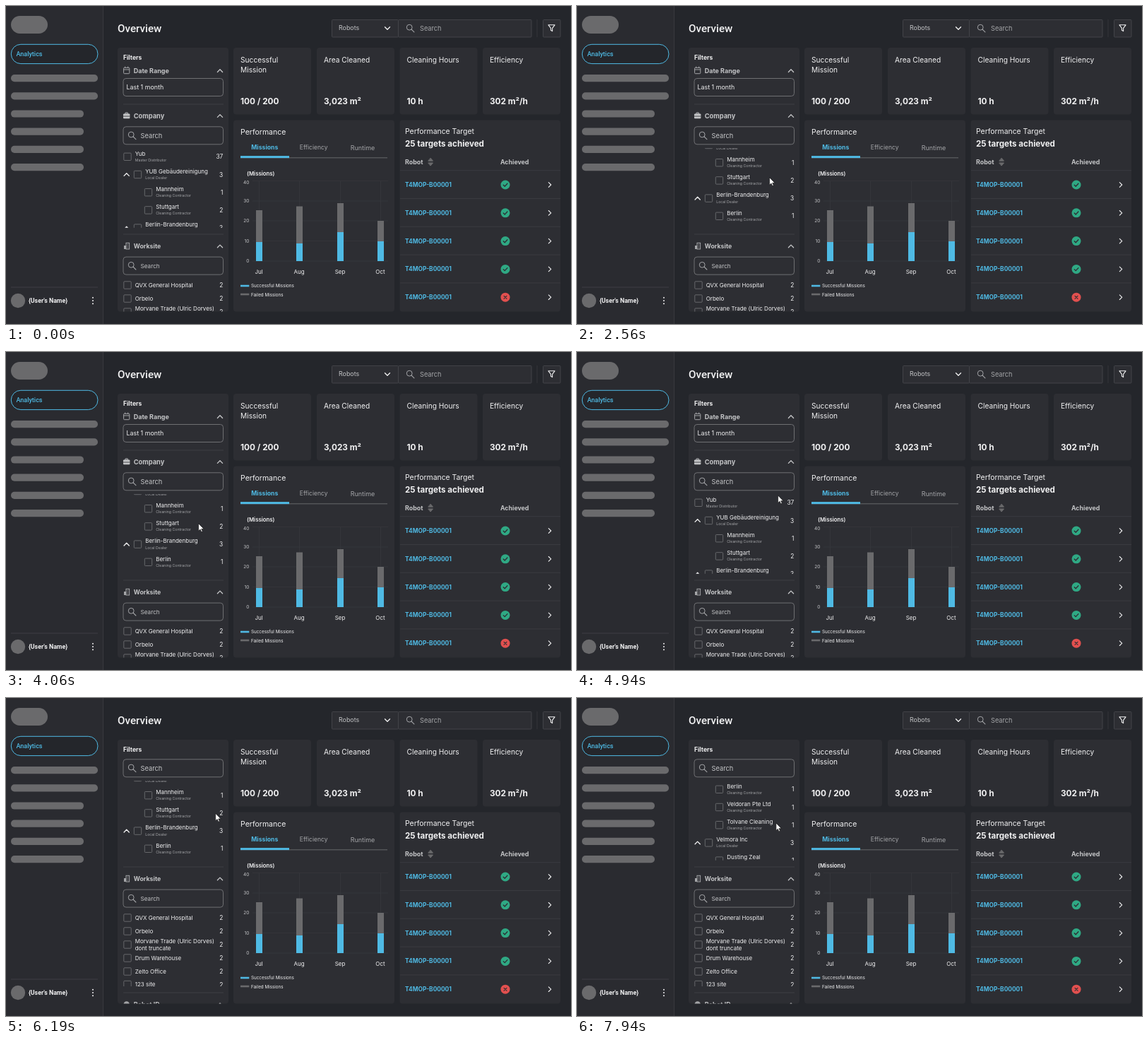
An HTML page for the animation above (8 s loop, 800x450 px).

```html
<!DOCTYPE html>
<html lang="en">
<head>
<meta charset="utf-8">
<title>Overview</title>
<style>
  html, body { margin: 0; width: 100%; height: 100%; overflow: hidden; background: #24262b; }
  svg { display: block; width: 800px; height: 450px; }
  text { font-family: Inter, "Open Sans", sans-serif; white-space: pre; }
  .rb { font-family: Roboto, Arial, sans-serif; }
</style>
</head>
<body>
<svg id="stage" viewBox="0 0 800 450" xmlns="http://www.w3.org/2000/svg"></svg>
<script>
const WHITE = '#f1f1f2', SOFT = '#c3c4c6', DIM = '#a4a5a8', GREY = '#6a6a6c';
const BLUE = '#4fbae4', CARD = '#2d2e33', EDGE = '#424348', LINE = '#3e3f44', RIM = '#6e6f72';

// ---- drawing helpers: each returns SVG markup ----
const rect = (x, y, w, h, fill, r = 0, stroke = 'none', sw = 1) =>
  `<rect x="${x}" y="${y}" width="${w}" height="${h}" rx="${r}" fill="${fill}" stroke="${stroke}" stroke-width="${sw}"/>`;
const path = (d, stroke, sw = 1, fill = 'none') =>
  `<path d="${d}" fill="${fill}" stroke="${stroke}" stroke-width="${sw}" stroke-linecap="round" stroke-linejoin="round"/>`;
const dot = (x, y, r, fill, stroke = 'none') =>
  `<circle cx="${x}" cy="${y}" r="${r}" fill="${fill}" stroke="${stroke}"/>`;
const hline = (x1, x2, y, c = LINE, w = 1) => rect(x1, y - w / 2, x2 - x1, w, c);
// y is the middle of the capitals
const text = (x, y, s, size, fill = WHITE, weight = 400, anchor = 'start', cls = '') =>
  `<text x="${x}" y="${(y + size * 0.36).toFixed(2)}" font-size="${size}" font-weight="${weight}" fill="${fill}" text-anchor="${anchor}" class="${cls}">${s}</text>`;
const clip = (id, x, y, w, h) => `<clipPath id="${id}">${rect(x, y, w, h, '#000')}</clipPath>`;

const up = (x, y, c = SOFT) => path(`M${x - 3.6} ${y + 1.9}l3.6 -3.7 3.6 3.7`, c, 1.3);
const down = (x, y) => path(`M${x - 3.5} ${y - 1.8}l3.5 3.6 3.5 -3.6`, WHITE, 1.3);
const next = (x, y) => path(`M${x - 1.7} ${y - 3.3}l3.4 3.3 -3.4 3.3`, WHITE, 1.1);
const lens = (x, y) => dot(x - 1.3, y - 1.3, 3.9, 'none', DIM) + path(`M${x + 1.6} ${y + 1.6}l3.8 3.8`, DIM, 1.1);
const box = (x, y) => rect(x - 5.2, y - 5.2, 10.4, 10.4, 'none', 1, RIM, 0.9);
const field = y => rect(166, y - 12.5, 141.5, 25, 'none', 4, RIM);

// ---- sidebar ----
function sidebar() {
  const bars = [123, 123, 103, 103, 103, 103];
  return rect(0, 0, 137, 450, '#2a2b30') + rect(137, 0, 1, 450, '#393a3f') +
    rect(7, 14, 52, 25, GREY, 12.5) +
    rect(7.3, 54.3, 122.7, 27.3, '#24262b', 13.6, BLUE) +
    text(14.5, 68.2, 'Analytics', 9, BLUE, 500, 'start', 'rb') +
    bars.map((w, i) => rect(7, 97 + i * 25.2, w, 10.2, GREY, 5)).join('') +
    hline(7, 130, 398) + dot(17, 417, 10.2, GREY) +
    text(32, 417.3, "{User's Name}", 8.8, WHITE, 700, 'start', 'rb') +
    [412.8, 417, 421.2].map(y => dot(123, y, 1, WHITE)).join('');
}

// ---- top bar ----
function topBar() {
  return text(158, 31.5, 'Overview', 15.2, WHITE, 500, 'start', 'rb') +
    rect(461.5, 19.5, 94, 24.5, CARD, 1, EDGE) + text(471, 31.2, 'Robots', 8.9, SOFT) + down(540, 31.5) +
    rect(555.5, 19.5, 188.5, 24.5, CARD, 1, EDGE) + lens(572.5, 31.5) + text(586, 31.5, 'Search', 9.2, DIM) +
    rect(751.5, 19, 1, 25, '#34353a') +
    rect(760.5, 19.5, 24.5, 24.5, CARD, 1, EDGE) +
    path('M768 26.8h9l-3.4 4.6v4.2l-2.2 -1.3v-2.9z', WHITE, 1.1);
}

// ---- summary cards ----
function cards() {
  const data = [
    [322, ['Successful', 'Mission'], '100 / 200'], [440, ['Area Cleaned'], '3,023 m²'],
    [557.5, ['Cleaning Hours'], '10 h'], [675, ['Efficiency'], '302 m²/h']
  ];
  return data.map(([x, title, value]) => rect(x, 59, 110, 94.5, CARD, 4) +
    title.map((s, i) => text(x + 10, 76.3 + i * 14, s, 10.2, WHITE)).join('') +
    text(x + 10, 134.5, value, 11.8, WHITE, 700)).join('');
}

// ---- chart ----
function chart() {
  const bars = [['Jul', 354, 289, 334], ['Aug', 411, 283.5, 336], ['Sep', 469, 279, 320], ['Oct', 526, 304, 333]];
  const ticks = [[40, 250, 247.5], [30, 276, 276], [20, 304, 304], [10, 332.5, 332.5], [0, 361, 361]];
  return rect(322, 161.5, 228, 271, CARD, 4) + text(332, 178.3, 'Performance', 10.5) +
    hline(332, 540, 214.8, '#66676a') + hline(332, 401, 213.6, BLUE, 3) +
    text(366.3, 200.3, 'Missions', 8.7, BLUE, 700, 'middle') +
    text(435.7, 200.3, 'Efficiency', 8.6, DIM, 400, 'middle') +
    text(505, 200.3, 'Runtime', 9, DIM, 400, 'middle') +
    text(341, 236.8, '(Missions)', 7.8, WHITE, 600) +
    ticks.map(([n, y, g]) => text(344.3, y, n, 6.5, SOFT, 400, 'end') + hline(349, 541, g, '#36373c', 0.8)).join('') +
    bars.map(([m, x, top, mid]) => rect(x + 4, 247.5, 0.8, 113.5, '#36373c') +
      rect(x, top, 9, mid - top, GREY) + rect(x, mid, 9, 361 - mid, BLUE) +
      text(x + 4, 376.3, m, 8, WHITE, 400, 'middle')).join('') +
    hline(332, 344.3, 396, BLUE, 2.6) + text(347, 396.2, 'Successful Missions', 6.3) +
    hline(332, 344.3, 408, GREY, 2.6) + text(347, 408.4, 'Failed Missions', 6.3);
}

// ---- targets table ----
function targets() {
  const row = i => {
    const y = 253 + i * 39.8, ok = i < 4;
    const mark = ok ? path(`M704.2 ${y + 0.2}l2 2 3.7 -4`, CARD, 1.3)
                    : path(`M705.1 ${y - 1.9}l3.8 3.8m0 -3.8l-3.8 3.8`, CARD, 1.2);
    return hline(558, 785, y - 20.3, '#3a3b40') +
      text(565, y, 'T4MOP-B00001', 8.4, BLUE, 700) +
      dot(707, y, 6.5, ok ? '#2fa984' : '#e2504f') + mark + next(770, y);
  };
  return rect(557.5, 161.5, 227.5, 271, CARD, 4) +
    text(565, 177.3, 'Performance Target', 10.4) +
    text(565, 195.2, '25 targets achieved', 11.6, WHITE, 700) +
    text(565, 220.5, 'Robot', 8.9, SOFT, 700) + text(700, 220.5, 'Achieved', 8.8, SOFT, 700) +
    path('M601.3 215.4l3.2 3.8h-6.4z', GREY, 1, GREY) + path('M601.3 225.8l3.2 -3.8h-6.4z', GREY, 1, GREY) +
    [0, 1, 2, 3, 4].map(row).join('');
}

// ---- filter panel ----
// name, level, count
const companies = [
  ['Yub', 0, 37], ['YUB Gebäudereinigung', 1, 3], ['Mannheim', 2, 1], ['Stuttgart', 2, 2],
  ['Berlin-Brandenburg', 1, 3], ['Berlin', 2, 1], ['Veldoran Pte Ltd', 2, 1], ['Tolvane Cleaning', 2, 1],
  ['Velmora Inc', 1, 3], ['Dusting Zeal', 2, 1], ['Dusting Zeal 2', 2, 1],
  ['Quorbeckham Supplies', 1, 3], ['Plumo Clean', 2, 1], ['Plumo Floors', 2, 1], ['Plumo Glass', 2, 1]
];
const roles = ['Master Distributor', 'Local Dealer', 'Cleaning Contractor'];
const sites = [
  [395, 'QVX General Hospital'], [414, 'Orbelo'], [433, 'Morvane Trade (Ulric Dorves)', 'dont truncate'],
  [452, 'Drum Warehouse'], [471, 'Zelto Office'], [489.5, '123 site']
];

const companyRow = ([name, level, count], i) => {
  const y = 213.3 + i * 25.2, x = 172 + [0, 14.5, 29.5][level];
  return box(x, y) + (level === 1 ? up(170.7, y, WHITE) : '') +
    text(x + 10.7, y - 4.5, name, 8) + text(x + 10.7, y + 4.7, roles[level], 5.25, DIM) +
    text(307.3, y, count, 8.4, WHITE, 400, 'end');
};
const siteRow = ([y, a, b]) => box(172, y) + text(307.3, y, 2, 8.4, WHITE, 400, 'end') +
  (b ? text(182.7, y - 5, a, 8) + text(182.7, y + 5, b, 8) : text(182.7, y, a, 8));
const head = (y, s, size) => text(180.7, y, s, size, SOFT, 700) + up(303, y + 0.3);

function filters() {
  const calendar = rect(166.6, 87.3, 8.2, 8.4, 'none', 1, DIM) + hline(166.6, 174.8, 90, DIM) +
    path('M168.7 86v1.5M172.7 86v1.5', DIM);
  const bag = rect(166, 152.6, 9.4, 6.6, SOFT, 1) + rect(168.8, 151, 3.8, 2, 'none', 0.5, SOFT) + hline(166, 175.4, 156, CARD, 0.8);
  const tower = rect(167, 339, 3, 5, DIM) + rect(170, 335.3, 4.6, 8.7, 'none', 0, DIM) +
    path('M172.3 337.4v.1M172.3 339.6v.1M172.3 341.8v.1', DIM, 1.1);
  return clip('panel', 158, 84, 157, 348.5) + clip('firms', 160, 201, 150, 112.8) + clip('places', 160, 384, 150, 108) +
    rect(158, 59, 157, 373.5, CARD, 4) + text(166, 72.5, 'Filters', 8.6, WHITE, 700) +
    `<g clip-path="url(#panel)"><g id="outer">` +
    calendar + head(91.3, 'Date Range', 9) + field(115) + text(170.5, 115.2, 'Last 1 month', 8.9) +
    hline(166, 308, 139) + bag + head(155.2, 'Company', 9.3) +
    field(183.3) + lens(178.5, 183.3) + text(190.5, 183.3, 'Search', 9.3, SOFT) +
    `<g clip-path="url(#firms)"><g id="inner">${companies.map(companyRow).join('')}</g></g>` +
    hline(166, 308, 323) + tower + head(339.6, 'Worksite', 8.8) +
    field(367.6) + lens(178.5, 367.6) + text(190.5, 367.6, 'Search', 8.2, SOFT) +
    `<g clip-path="url(#places)">${sites.map(siteRow).join('')}</g>` +
    hline(166, 308, 501) + dot(170.7, 517.5, 4.2, DIM) + head(517.5, 'Robot ID', 9) +
    `</g></g>`;
}

const pointer = `<g id="cursor" visibility="hidden">` +
  path('M0 0v10.2l2.4 -2.2 1.6 3.6 1.7 -.8 -1.6 -3.4h3.2z', '#1a1a1c', 0.7, '#fff') + `</g>`;

document.getElementById('stage').innerHTML =
  rect(0, 0, 800, 450, '#24262b') + sidebar() + topBar() + cards() + filters() + chart() + targets() + pointer;

// ---- motion, in ticks of 1/16 s ----
const LOOP = 8000, TICK = 62.5, NOTCH = 42;
// [tick, wheel notches]
const innerSteps = [
  [0, 0], [41, 1], [44, 2], [49, 3], [51, 4], [56, 5], [58, 6], [61, 5], [63, 3], [65, 1], [66, 0],
  [88, 1], [89, 2], [90, 3], [94, 4], [97, 3], [98, 2], [99, 1], [100, 0], [117, 2], [122, 3]
];
const outerSteps = [[0, 0], [84, 1], [85, 2], [101, 1], [104, 0], [109, 1], [112, 2]];
// [tick, x, y]
const track = [
  [23, 424, 58.5], [32, 272.6, 243], [76, 272.6, 243], [82, 296.7, 163.6],
  [104, 296.7, 163.6], [108, 275, 155.5], [126, 275, 155.5], [127, 281.9, 177.3], [128, 281.9, 177.3]
];

const held = (steps, n) => steps.filter(s => s[0] <= n).pop()[1];
const ease = p => p * p * (3 - 2 * p);
function spot(n) {
  const i = track.findIndex(k => k[0] > n);
  const [t0, x0, y0] = track[i - 1], [t1, x1, y1] = track[i];
  const p = ease((n - t0) / (t1 - t0));
  return [x0 + (x1 - x0) * p, y0 + (y1 - y0) * p];
}

const [outer, inner, cursor] = ['outer', 'inner', 'cursor'].map(id => document.getElementById(id));
const move = (el, x, y) => el.setAttribute('transform', `translate(${x} ${y})`);

function draw(ms) {
  const n = Math.min(127, Math.floor((ms % LOOP + 3) / TICK));
  move(outer, 0, -NOTCH * held(outerSteps, n));
  move(inner, 0, -NOTCH * held(innerSteps, n));
  const shown = n >= track[0][0];
  cursor.setAttribute('visibility', shown ? 'visible' : 'hidden');
  if (shown) move(cursor, ...spot(n));
}

const start = performance.now();
function frame() {
  draw(performance.now() - start);
  requestAnimationFrame(frame);
}
frame();
</script>
</body>
</html>
```
